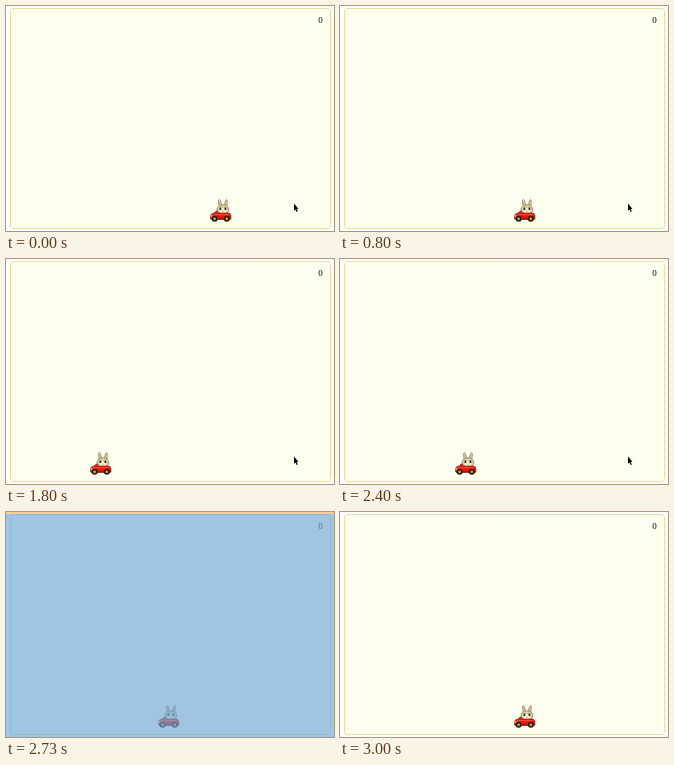
Animation of 328 by 225 pixels, one loop 3.14 s. Source, as an HTML page:

```html
<!DOCTYPE html>
<html lang="en">
<head>
<meta charset="utf-8">
<title>Rabbit car</title>
<style>
html, body { margin: 0; width: 100%; height: 100%; overflow: hidden; background: #fff; }
svg { display: block; width: 328px; height: 225px; }
text { font: 9px "Liberation Serif", "Noto Serif", serif; text-anchor: middle; }
</style>
</head>
<body>
<svg viewBox="0 0 328 225">
  <defs>
    <g id="wheel">
      <circle r="3" fill="#2a1708"/>
      <circle r="1.4" fill="#d2a63c"/>
    </g>
  </defs>
  <rect x="4.5" y="2.5" width="320" height="220" rx="3" fill="#fffff0" stroke="#cfc25c" stroke-dasharray="1 1"/>
  <text x="314.5" y="17">0</text>

  <g id="car">
    <!-- rabbit -->
    <path d="M9.3 202L8.4 194.5Q9 192.5 10.4 194.5L12 200H14L15.6 194.5Q17 192.5 17.4 195L16.7 202Z" fill="#d8d2b4" stroke="#857b58" stroke-width=".7"/>
    <path d="M9.6 195.5L10.6 200M16.2 195.5L15.4 200" stroke="#d9a596" stroke-width=".8"/>
    <ellipse cx="12.9" cy="203.6" rx="6" ry="4.8" fill="#d9cda2" stroke="#857b58" stroke-width=".7"/>
    <ellipse cx="12.9" cy="204.8" rx="3.4" ry="2.8" fill="#f4efda"/>
    <path d="M9.6 201.6h1.6v2.4H9.6zM14.6 201.6h1.6v2.4h-1.6z" fill="#282418"/>
    <path d="M12.2 204.8h1.5l-.7 1z" fill="#a8704c"/>
    <!-- car -->
    <path d="M.6 213V209.5Q1 207.3 4 207.1L6 205.2H8L7.2 207H18.6Q20.9 207.6 20.9 210V213Z" fill="#e8160c" stroke="#8c1208" stroke-width=".6"/>
    <path d="M3 208.7H18.5" stroke="#ff6a48" stroke-width=".8"/>
    <path d="M.6 209.2h2v1.5h-2z" fill="#ffd75e"/>
    <path d="M1 213.2H20.5" stroke="#6b1008"/>
    <use href="#wheel" x="4.6" y="212.8"/>
    <use href="#wheel" x="16.8" y="212.8"/>
  </g>

  <path id="pointer" d="M288 197.5V204.8L289.5 203.4L290.7 206L291.8 205.5L290.7 203H292.5Z"/>
  <g id="flash" opacity=".66">
    <rect y="2" width="328" height="223" fill="rgb(111,168,220)"/>
    <rect width="328" height="2" fill="rgb(246,178,107)"/>
  </g>
</svg>
<script>
const LOOP = 3140, TICK = 200 / 3;
// [tick, car x]
const path = [[0, 204], [1, 204], [4, 196], [8, 196], [9, 195], [12, 174], [20, 111], [24, 77],
  [27, 84], [31, 84], [32, 86], [36, 115], [41, 152], [44, 172], [45, 174], [48, 174]];
const $ = id => document.getElementById(id);
const show = (id, on) => $(id).setAttribute("visibility", on ? "visible" : "hidden");

function carX(tick) {
  const i = path.findIndex(p => p[0] > tick);
  const [a, x] = path[i - 1], [b, y] = path[i];
  return Math.round(x + (y - x) * (tick - a) / (b - a));
}

function draw() {
  const tick = Math.floor((performance.now() % LOOP + 4) / TICK);
  $("car").setAttribute("transform", `translate(${carX(tick)})`);
  show("pointer", tick < 38);
  show("flash", tick === 41);
  requestAnimationFrame(draw);
}
draw();
</script>
</body>
</html>
```
